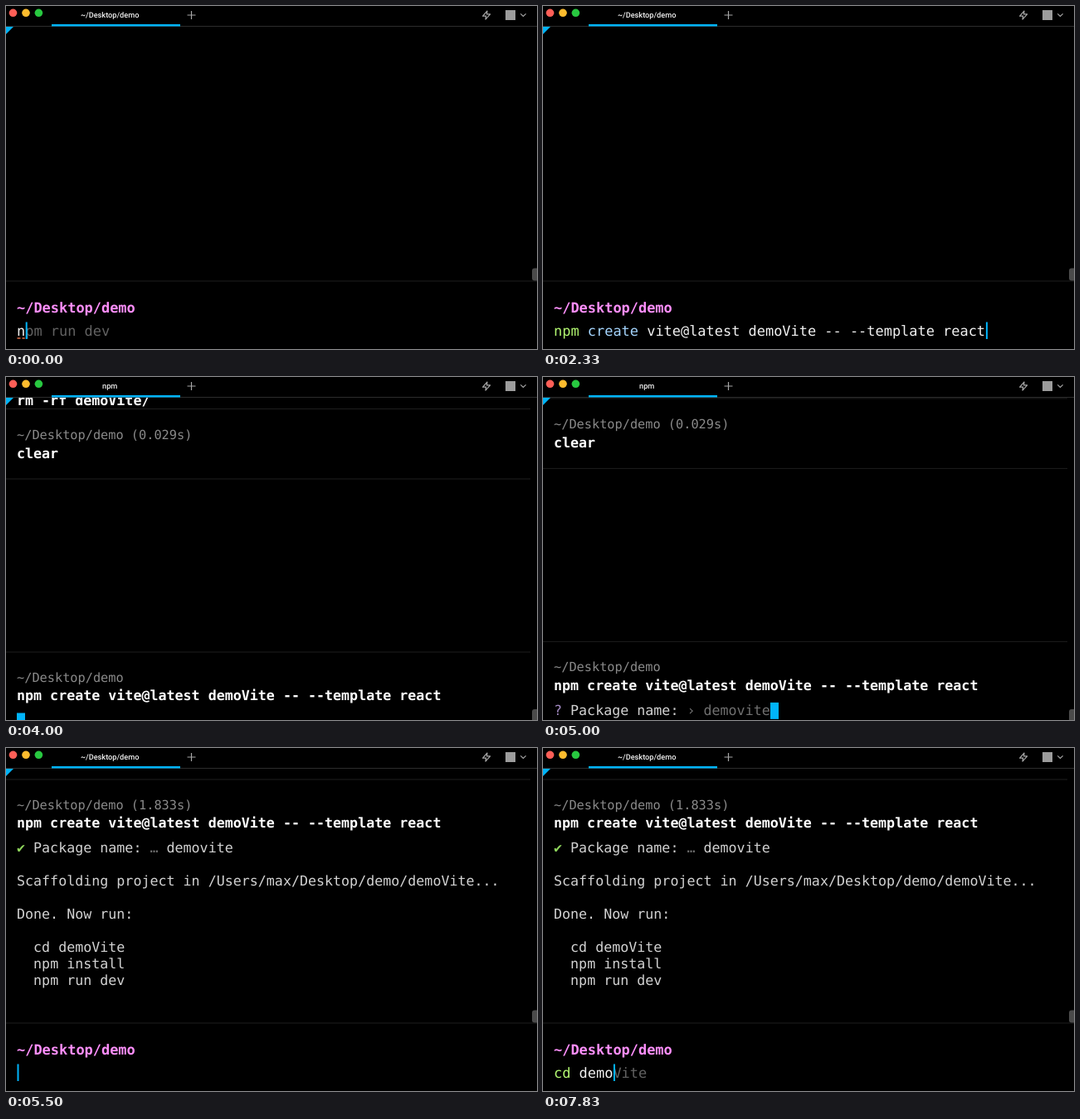
Animation, 640 px wide and 414 px high, one loop 8000 ms. Source, as an HTML page:

```html
<!DOCTYPE html>
<html lang="en">
<head>
<meta charset="utf-8">
<title>Terminal</title>
<style>
  html, body { margin: 0; width: 100%; height: 100%; overflow: hidden; background: #000; }
  svg { display: block; width: 100vw; height: 100vh; }
  text {
    font-family: "DejaVu Sans Mono", monospace;
    font-size: 16.67px;
    fill: #d2d2d2;
    white-space: pre;
    text-rendering: geometricPrecision;
  }
  .title { font: 500 9.2px Roboto, sans-serif; fill: #f4f4f4; text-anchor: middle; }
  .head { font-size: 15.28px; fill: #8a8a8a; }
  .cmd { font-weight: bold; fill: #fff; }
  .prompt { font-size: 16.95px; font-weight: bold; fill: #ff8ffd; }
  .input { font-size: 16.95px; fill: #f1f1f1; }
  .green { fill: #b4fa72; }
  .blue { fill: #a5d5fe; }
  .check { fill: #8fd65c; }
  .ask { fill: #a48bc4; }
  .dim { fill: #707070; }
  .ghost { fill: #626262; }
  .rule { stroke: #1e1e1e; }
  .accent { fill: #00b4fa; }
  .icon { fill: none; stroke: #a6a6a6; stroke-width: 1.2; }
</style>
</head>
<body>
<svg viewBox="0 0 640 414" xml:space="preserve">
  <defs>
    <clipPath id="view"><rect y="24" width="640" height="390"/></clipPath>
  </defs>

  <g clip-path="url(#view)">
    <g id="running">
      <g id="scroll">
        <text class="cmd" x="13" y="33.7">rm -rf demoVite/</text>
        <path class="rule" d="M0 38.5H632M0 123H632M0 332H632"/>
        <text class="head" x="13" y="75">~/Desktop/demo (0.029s)</text>
        <text class="cmd" x="13" y="97.5">clear</text>
        <text class="head" x="13" y="368">~/Desktop/demo</text>
        <text class="cmd" x="13" y="390.3">npm create vite@latest demoVite -- --template react</text>
        <text id="question" x="13" y="420.5"><tspan class="ask">?</tspan> Package name: <tspan class="dim">› demovite</tspan></text>
        <rect id="block" class="accent" y="405.5" width="10" height="20"/>
      </g>
    </g>

    <g id="done">
      <path class="rule" d="M0 38H632"/>
      <text class="head" x="13" y="74">~/Desktop/demo (1.833s)</text>
      <text class="cmd" x="13" y="96.3">npm create vite@latest demoVite -- --template react</text>
      <text x="13" y="126.4"><tspan class="check">✔</tspan> Package name: <tspan class="dim">…</tspan> demovite</text>
      <text x="13" y="166.4">Scaffolding project in /Users/max/Desktop/demo/demoVite...</text>
      <text x="13" y="206.4">Done. Now run:</text>
      <text x="33.1" y="246.4">cd demoVite</text>
      <text x="33.1" y="266.4">npm install</text>
      <text x="33.1" y="286.4">npm run dev</text>
    </g>

    <g id="editor">
      <path class="rule" d="M0 332H640"/>
      <text class="prompt" x="13" y="369.5">~/Desktop/demo</text>
      <text class="input" x="13" y="397.6"><tspan id="word"></tspan><tspan id="sub" class="blue"></tspan><tspan id="rest"></tspan><tspan id="ghost" class="ghost"></tspan></text>
      <path id="error" stroke="#e0714c" stroke-width="1.4" stroke-dasharray="4 2"/>
      <rect id="caret" class="accent" y="381.5" width="2" height="20.5"/>
    </g>
    <rect id="thumb" x="634" width="10" height="15" rx="3" fill="#4a4a4a"/>
  </g>

  <path d="M0 24.5H640" stroke="#2c2c2c"/>
  <rect class="accent" x="55" y="22" width="155" height="2.5"/>
  <path class="accent" d="M0 25H9L0 34Z"/>
  <circle cx="8.5" cy="8.3" r="4.8" fill="#ff5f57"/>
  <circle cx="24" cy="8.3" r="4.8" fill="#febc2e"/>
  <circle cx="39.4" cy="8.3" r="4.8" fill="#28c840"/>
  <text id="title" class="title" x="125.2" y="14.2"></text>
  <path class="icon" d="M218.5 11H228.5M223.5 6V16"/>
  <path class="icon" stroke-linejoin="round" d="M580 6L574.6 12.2H578.6L578 16.2L583.6 9.9H579.5Z"/>
  <rect x="602" y="5" width="12" height="12" fill="#9c9c9c"/>
  <path class="icon" d="M620.2 9.3L623.4 12.5L626.6 9.3"/>
</svg>

<script>
  const LOOP = 8000, FPS = 6, LEFT = 13, CELL = 10.204;
  const RUN = 21, ASK = 26, DONE = 32;
  const CREATE = "npm create vite@latest demoVite -- --template react";
  const DEV = "npm run dev", CD = "cd demoVite";

  // [tick, typed length, suggested line]
  const typing = [
    [0, 1, DEV], [1, 2, DEV], [4, 3, DEV], [5, 4, DEV],
    [7, 5, CREATE], [11, CREATE.length, CREATE],
    [DONE, 0, ""],
    [36, 1, CD], [37, 2, CD], [39, 3, CD], [41, 4, CD],
    [43, 5, CD], [44, 6, CD], [45, 7, CD]
  ];

  const $ = id => document.getElementById(id);
  const show = (id, on) => $(id).setAttribute("visibility", on ? "visible" : "hidden");
  const set = (id, name, value) => $(id).setAttribute(name, value);

  function drawInput(tick) {
    const [, count, line] = typing.filter(s => s[0] <= tick).pop();
    const typed = line.slice(0, count);
    const word = typed.split(" ")[0];
    const known = word === "npm" || word === "cd";
    const sub = typed.startsWith("npm create") ? " create" : "";
    $("word").textContent = word;
    set("word", "class", known ? "green" : "");
    $("sub").textContent = sub;
    $("rest").textContent = typed.slice(word.length + sub.length);
    $("ghost").textContent = line.slice(count);
    set("caret", "x", LEFT + count * CELL + 0.5);
    set("error", "d", known || !word ? "" : `M${LEFT + 0.5} 401H${LEFT + word.length * CELL - 0.5}`);
  }

  function draw(tick) {
    const running = tick >= RUN && tick < DONE;
    const asking = running && tick >= ASK;
    show("running", running);
    show("done", tick >= DONE);
    show("editor", !running);
    show("question", asking);
    set("scroll", "transform", `translate(0 ${asking ? -12.6 : 0})`);
    set("block", "x", asking ? 274 : LEFT);
    set("thumb", "y", running ? 401 : 316.5);
    $("title").textContent = running ? "npm" : "~/Desktop/demo";
    drawInput(tick);
  }

  let last = -1;
  function frame() {
    const tick = Math.floor((performance.now() % LOOP + 1) * FPS / 1000) % (LOOP * FPS / 1000);
    if (tick !== last) draw(last = tick);
    requestAnimationFrame(frame);
  }
  frame();
</script>
</body>
</html>
```
